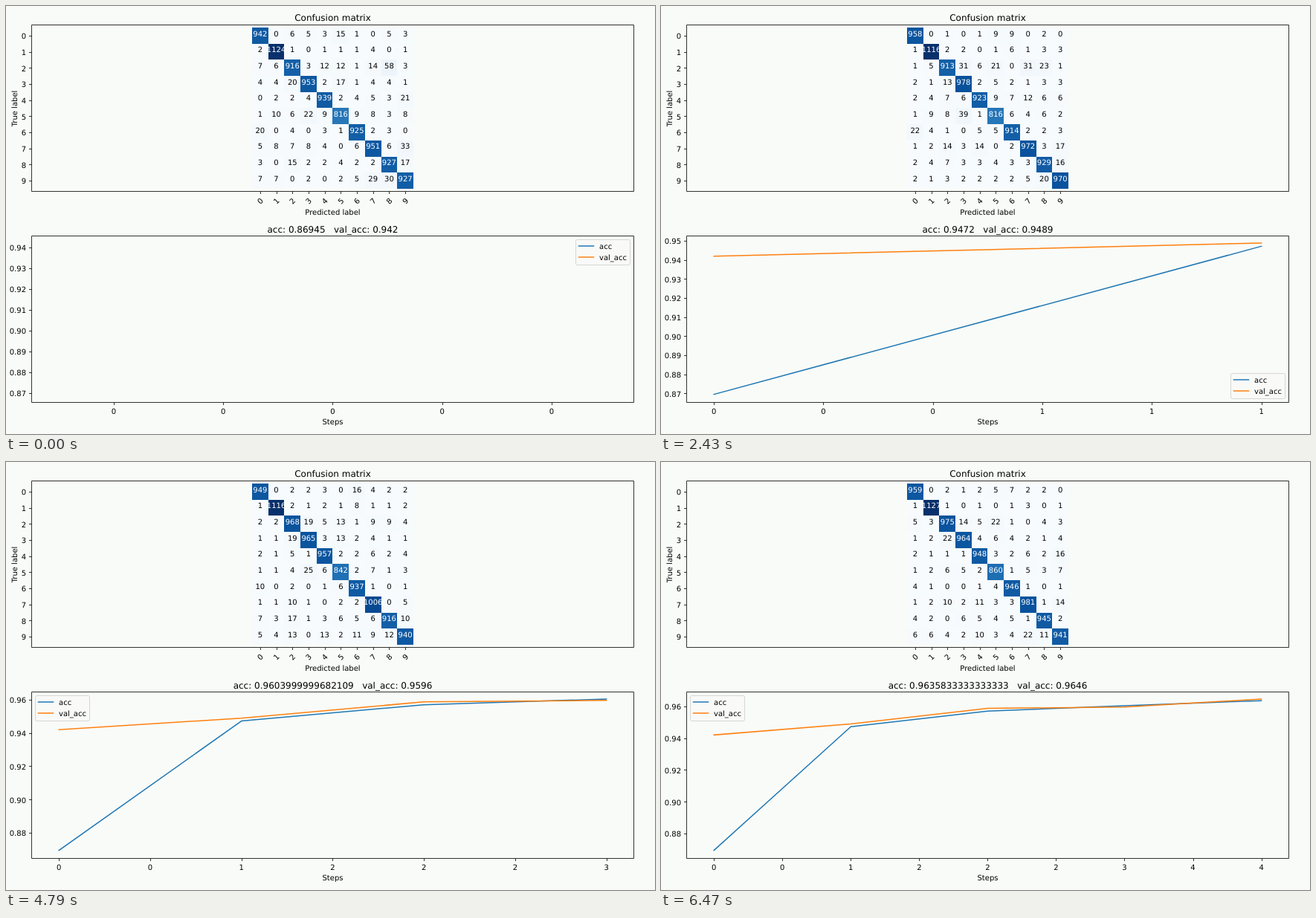
An HTML page for the animation above (8000 ms loop, 873x576 px).

```html
<!DOCTYPE html>
<html lang="en">
<head>
<meta charset="utf-8">
<title>Training progress</title>
<style>
  html, body { margin: 0; width: 100%; height: 100%; overflow: hidden; background: #f9fbf8; }
  #stage { position: relative; width: 873px; height: 576px; overflow: hidden; }
  #base { position: absolute; left: 0; top: 0; }
  #strip { position: absolute; left: 0; top: 0; animation: flip 8s step-end infinite; }
  svg { display: block; width: 873px; height: 576px; }
  text { font: 10px "DejaVu Sans", sans-serif; white-space: pre; text-anchor: middle; text-rendering: geometricPrecision; }
  .title { font-size: 12px; }
  .start { text-anchor: start; }
  .end { text-anchor: end; }
  .axis { fill: none; stroke: #000; stroke-width: .8; }
  .cell { shape-rendering: crispEdges; }
  .line { fill: none; stroke-width: 1.5; stroke-linecap: square; stroke-linejoin: round; }
  .legend { fill: #f9fbf8; fill-opacity: .8; stroke: #ccc; stroke-opacity: .8; }
  @keyframes flip {
    0% { transform: translateY(0); }
    17.75% { transform: translateY(-576px); }
    38.75% { transform: translateY(-1152px); }
    59.875% { transform: translateY(-1728px); }
    80.875%, 100% { transform: translateY(-2304px); }
  }
</style>
</head>
<body>
<div id="stage">
  <svg id="base"></svg>
  <div id="strip"></div>
</div>
<script>
const LEFT = 34.4, RIGHT = 844.4, MID = 439.5;
const TOP = 308.8, BOTTOM = 532.8;
const CELL = 21.69;
const BLUE = '#1f77b4', ORANGE = '#ff7f0e';
const BLUES = ['f7fbfd', 'deebf7', 'c6dbef', '9ecae1', '6baed6', '4292c6', '2171b5', '08519c', '08306b'];
const DIGITS = [...Array(10).keys()];

// Samples per digit, and the digits each one is mostly mistaken for.
const SAMPLES = [980, 1135, 1032, 1010, 982, 892, 958, 1028, 974, 1009];
const LOOKALIKES = ['56', '67', '3578', '25', '79', '3', '05', '249', '29', '478'];

const UPPER_RIGHT = [766.5, 314.5], LOWER_RIGHT = [766.5, 494.5], UPPER_LEFT = [39.5, 314.5];
const epochs = [
  { acc: '0.86945', step: .02, legend: UPPER_RIGHT, hits: [942, 1124, 916, 953, 939, 816, 925, 951, 927, 927] },
  { acc: '0.9472', step: .2, legend: LOWER_RIGHT, hits: [958, 1116, 913, 978, 923, 816, 914, 972, 929, 970] },
  { acc: '0.9569833333333333', step: .25, legend: UPPER_LEFT, hits: [962, 1121, 927, 982, 946, 831, 935, 971, 944, 968] },
  { acc: '0.9603999999682109', step: .5, legend: UPPER_LEFT, hits: [949, 1116, 968, 965, 957, 842, 937, 1006, 916, 940] },
  { acc: '0.9635833333333333', step: .5, legend: UPPER_LEFT, hits: [959, 1127, 975, 964, 948, 860, 946, 981, 945, 941] }
];
const sum = list => list.reduce((a, b) => a + b, 0);
epochs.forEach(e => e.val = sum(e.hits) / 1e4);

const text = (x, y, str, cls = '', extra = '') =>
  `<text x="${x}" y="${y}" class="${cls}" ${extra}>${str}</text>`;
const path = (d, cls, stroke = '') => `<path d="${d}" class="${cls}" ${stroke && `stroke="${stroke}"`}/>`;
const snap = v => Math.round(v) + .5;
const center = i => 39.87 + CELL * i;
const column = i => 341.87 + CELL * i;

const xTick = (x, y) => path(`M${snap(x)} ${snap(y)}v3.5`, 'axis');
const yTick = (y, label) =>
  path(`M${snap(LEFT)} ${snap(y)}h-3.5`, 'axis') + text(27, Math.round(y + 4.3), label, 'end');

function seeded(seed) {
  let state = seed;
  return () => (state = state * 16807 % 2147483647) / 2147483647;
}

function halfEven(v) {
  const r = Math.round(v);
  return Math.abs(v % 1) === .5 && r % 2 ? r - 1 : r;
}

function ticks(lo, hi, step) {
  const list = [];
  for (let k = Math.ceil(lo / step); k * step <= hi; k++) list.push(k * step);
  return list;
}

function shade(ratio) {
  const i = Math.min(7, Math.floor(ratio * 8)), f = ratio * 8 - i;
  const channel = (hex, c) => parseInt(hex.substr(c * 2, 2), 16);
  const mix = c => Math.round(channel(BLUES[i], c) * (1 - f) + channel(BLUES[i + 1], c) * f);
  return `rgb(${[0, 1, 2].map(mix)})`;
}

// Spreads the misses of one digit over the others, so that the row adds up.
function confusionRow(digit, hit, random) {
  const weights = DIGITS.map(d =>
    d === digit ? 0 : random() * (LOOKALIKES[digit].includes(d) ? 5 : 1));
  const scale = (SAMPLES[digit] - hit) / sum(weights);
  let exact = 0, given = 0;
  return weights.map((w, d) => {
    if (d === digit) return hit;
    exact += w * scale;
    const count = Math.round(exact) - given;
    given += count;
    return count;
  });
}

function drawBase() {
  const frame = y => path(`M${snap(LEFT)} ${y}H${snap(RIGHT)}v224H${snap(LEFT)}z`, 'axis');
  return frame(25.5) + frame(snap(TOP)) +
    text(MID, 20, 'Confusion matrix', 'title') +
    text(MID, 281, 'Predicted label') +
    text(MID, 563, 'Steps') +
    text(0, 0, 'True label', '', 'transform="translate(14.5 138) rotate(-90)"') +
    DIGITS.map(i => yTick(center(i), i) + xTick(column(i), 249) +
      text(0, 3.65, i, '', `transform="translate(${column(i)} 262.3) rotate(-45)"`)).join('');
}

function drawMatrix({ hits }, n) {
  const random = seeded(4211 + 977 * n);
  const max = Math.max(...hits);
  let cells = '', labels = '';
  hits.forEach((hit, row) => confusionRow(row, hit, random).forEach((v, col) => {
    cells += `<rect class="cell" x="${column(col) - CELL / 2}" y="${center(row) - CELL / 2}" width="${CELL}" height="${CELL}" fill="${shade(v / max)}"/>`;
    labels += text(column(col), Math.floor(center(row) + 1.2), v, '', `fill="${v > max / 2 ? '#fff' : '#000'}"`);
  }));
  return cells + labels;
}

function drawLegend([x, y]) {
  const entry = (dy, color, label) =>
    path(`M${x + 4} ${y + dy}h20`, 'line', color) + text(x + 31.5, y + dy + 4, label, 'start');
  return `<rect class="legend" x="${x}" y="${y}" width="73" height="34" rx="2"/>` +
    entry(8.5, BLUE, 'acc') + entry(23.5, ORANGE, 'val_acc');
}

function drawChart({ acc, val, step, legend }, n) {
  const past = epochs.slice(0, n + 1);
  const series = key => past.map(e => +e[key]);
  const all = [...series('acc'), ...series('val')];
  const min = Math.min(...all), max = Math.max(...all), pad = (max - min) * .05;
  const [x0, x1] = n ? [-.05 * n, 1.05 * n] : [-.055, .055];
  const [y0, y1] = [min - pad, max + pad];
  const px = x => LEFT + (x - x0) / (x1 - x0) * (RIGHT - LEFT);
  const py = y => BOTTOM - (y - y0) / (y1 - y0) * (BOTTOM - TOP);
  const curve = (key, color) =>
    n ? path('M' + series(key).map((v, i) => `${px(i)} ${py(v)}`).join('L'), 'line', color) : '';

  return text(MID, 305, `acc: ${acc}   val_acc: ${val}`, 'title') +
    ticks(x0, x1, step).map(x => xTick(px(x), BOTTOM) + text(px(x), 549, halfEven(x))).join('') +
    ticks(y0, y1, n < 2 ? .01 : .02).map(y => yTick(py(y), y.toFixed(2))).join('') +
    curve('acc', BLUE) + curve('val', ORANGE) + drawLegend(legend);
}

document.getElementById('base').innerHTML = drawBase();
document.getElementById('strip').innerHTML =
  epochs.map((e, n) => `<svg>${drawMatrix(e, n)}${drawChart(e, n)}</svg>`).join('');
</script>
</body>
</html>
```
